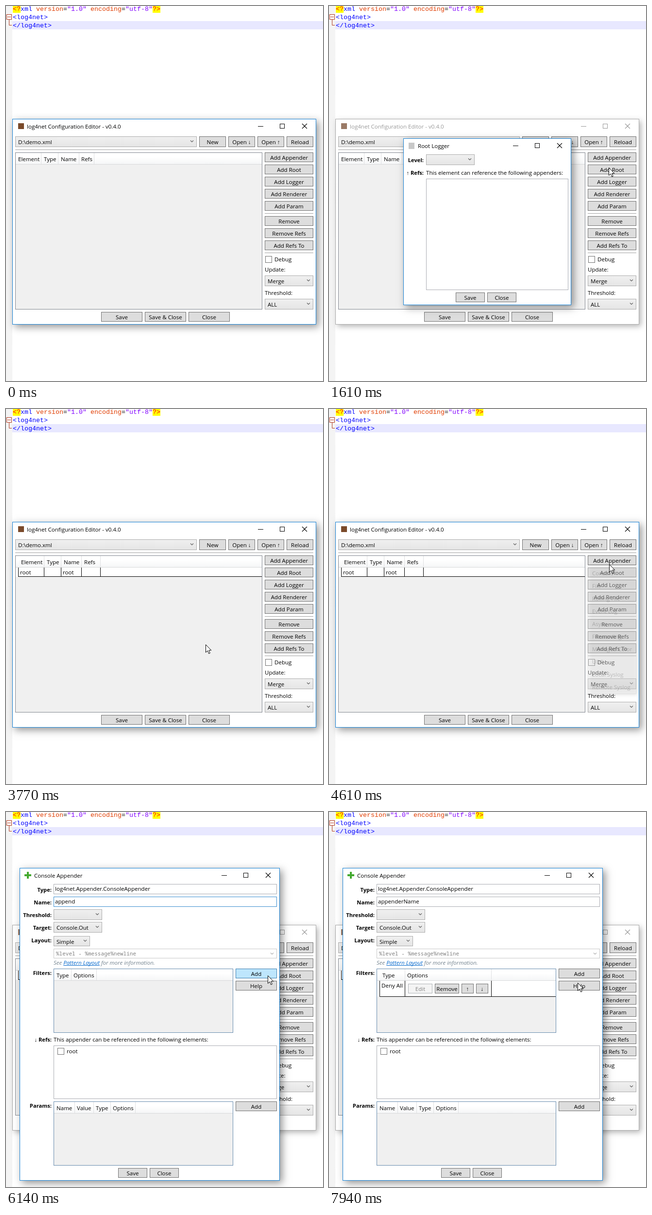
These frames come from a looping animation (653 by 771 pixels, 8000 ms). An HTML page with a canvas:

```html
<!DOCTYPE html>
<html lang="en">
<head>
<meta charset="utf-8">
<title>Configuration editor demo</title>
<style>
html, body { margin: 0; width: 100%; height: 100%; overflow: hidden; background: #fff; }
canvas { display: block; }
</style>
</head>
<body>
<canvas id="stage" width="653" height="771"></canvas>
<script>
const ctx = document.getElementById('stage').getContext('2d');
const LOOP = 8000;
const UI = '11.55px "Open Sans", "Noto Sans", sans-serif';
const BOLD = 'bold 11.2px "Open Sans", "Noto Sans", sans-serif';
const ITALIC = 'italic 11.55px "Open Sans", "Noto Sans", sans-serif';
const CODE = '13.333px "Liberation Mono", monospace';
const MONO = '11px "Noto Sans Mono", monospace';

// Each move: start, end, target x, target y
const START = [26, 470];
const MOVES = [
  [250, 1290, 576, 332], [1860, 2860, 296, 597], [3330, 4330, 577, 319],
  [4750, 4950, 576, 338], [5700, 6500, 512, 334], [6700, 6880, 512, 351]
];
const PRESSES = [[1290, 1360], [2860, 2920], [4330, 4400], [6520, 6600]];
const APPENDERS = ['Console', 'File', 'Rolling File', 'Event Log', 'Async', 'Forwarding',
  'Managed Color', 'UDP', 'Local Syslog', 'Remote Syslog'];
const FILTERS = ['Deny All', 'Level', 'Level Range', 'Logger', 'String', 'Property'];

let t = 0, hot = null;

const ramp = (a, b) => Math.min(1, Math.max(0, (t - a) / (b - a)));
const within = (a, b) => t >= a && t < b;

function pointer(time) {
  let [x, y] = START;
  for (const [a, b, tx, ty] of MOVES) {
    const p = Math.min(1, Math.max(0, (time - a) / (b - a)));
    const e = (1 - Math.cos(Math.PI * p)) / 2;
    x += (tx - x) * e;
    y += (ty - y) * e;
  }
  return [x, y];
}

function fill(x, y, w, h, color) {
  ctx.fillStyle = color;
  ctx.fillRect(x, y, w, h);
}

function box(x, y, w, h, color, border) {
  fill(x, y, w, h, color);
  ctx.strokeStyle = border;
  ctx.lineWidth = 1;
  ctx.strokeRect(x + .5, y + .5, w - 1, h - 1);
}

function text(str, x, y, { color = '#000', font = UI, align = 'left' } = {}) {
  ctx.font = font;
  ctx.fillStyle = color;
  ctx.textAlign = align;
  ctx.fillText(str, x, y);
  return x + ctx.measureText(str).width;
}

function line(color, width, ...points) {
  ctx.strokeStyle = color;
  ctx.lineWidth = width;
  ctx.beginPath();
  for (let i = 0; i < points.length; i += 2) ctx.lineTo(points[i], points[i + 1]);
  ctx.stroke();
}

function shadowed(strength, size, draw) {
  ctx.save();
  ctx.shadowColor = `rgba(0,0,0,${strength})`;
  ctx.shadowBlur = size;
  ctx.shadowOffsetX = ctx.shadowOffsetY = size / 3;
  draw();
  ctx.restore();
}

function button(x, y, w, h, label, enabled = true) {
  const over = hot && hot[0] >= x && hot[0] < x + w && hot[1] >= y && hot[1] < y + h;
  const down = over && PRESSES.some(p => within(...p));
  if (!enabled) box(x, y, w, h, '#f4f4f4', '#adb2b5');
  else if (over) box(x, y, w, h, down ? '#c4e5f6' : '#bee6fd', down ? '#2c628b' : '#3c7fb1');
  else box(x, y, w, h, '#ddd', '#707070');
  text(label, x + w / 2, y + h / 2 + 5, { align: 'center', color: enabled ? '#000' : '#838383' });
}

const chevron = (x, y, color = '#606060') => line(color, 1.2, x - 3, y - 1.5, x, y + 1.5, x + 3, y - 1.5);

function combo(x, y, w, h, label = '') {
  const shade = ctx.createLinearGradient(0, y, 0, y + h);
  shade.addColorStop(0, '#f0f0f0');
  shade.addColorStop(1, '#e5e5e5');
  box(x, y, w, h, shade, '#acacac');
  text(label, x + 6, y + 16);
  chevron(x + w - 10, y + h / 2 - 1);
}

function checkbox(x, y, label, tx) {
  box(x, y, 14, 14, '#fff', '#707070');
  text(label, tx, y + 10.5);
}

// Columns: label, text x, divider x
function grid(x, y, w, h, border, columns) {
  box(x, y, w, h, '#f0f0f0', border);
  const shade = ctx.createLinearGradient(0, y, 0, y + 24);
  shade.addColorStop(.4, '#fff');
  shade.addColorStop(1, '#f5f6f7');
  fill(x + 1, y + 1, w - 2, 23, shade);
  fill(x + 1, y + 24, w - 2, 1, '#d8d9da');
  for (const [label, tx, divider] of columns) {
    text(label, tx, y + 18);
    fill(divider, y + 1, 1, 23, '#dedfe1');
  }
}

function gridRow(x, right, y, h, dividers) {
  fill(x - 5, y, right - x + 5, h, '#fff');
  fill(x, y + h - 1, right - x, 1, '#000');
  for (const d of [x, ...dividers]) fill(d, y, 1, h, '#000');
}

function frame(x, y, w, h, title, active) {
  shadowed(active ? .42 : .3, active ? 15 : 11, () => fill(x, y, w, h, '#fff'));
  box(x, y, w, h, '#fff', active ? '#1883d7' : '#aaa');
  const ink = active ? '#000' : '#999', r = x + w, c = y + 15;
  text(title, x + 30, y + 20, { color: ink });
  fill(r - 120, c, 11, 1, ink);
  ctx.strokeStyle = ink;
  ctx.strokeRect(r - 74.5, c - 4.5, 9, 9);
  line(ink, 1.1, r - 29, c - 5, r - 19, c + 5);
  line(ink, 1.1, r - 29, c + 5, r - 19, c - 5);
}

function menu(x, y, w, items, alpha, selected) {
  if (alpha <= 0) return;
  ctx.save();
  ctx.globalAlpha = alpha;
  const h = items.length * 26 + 4;
  shadowed(.55, 7, () => fill(x, y, w, h, '#f0f0f0'));
  box(x, y, w, h, '#f2f2f2', '#a0a0a0');
  if (selected) box(x + 2, y + 2, w - 4, 26, '#c3e1f0', '#26a0da');
  items.forEach((item, i) => text(item, x + 9, y + 20 + i * 26));
  ctx.restore();
}

function editor() {
  fill(0, 0, 653, 771, '#fff');
  fill(0, 0, 13, 771, hatch);
  fill(13, 31, 640, 17, '#e8e8ff');
  fill(14, 0, 16, 14, '#ff0');
  fill(302, 0, 16, 14, '#ff0');
  const parts = [['<?', '#f00'], ['xml', '#00f'], [' version', '#e03c00'], ['=', '#000'],
    ['"1.0"', '#8000ff'], [' encoding', '#e03c00'], ['=', '#000'], ['"utf-8"', '#8000ff'], ['?>', '#f00']];
  let x = 14;
  for (const [str, color] of parts) x = text(str, x, 10, { color, font: CODE });
  text('<log4net>', 14, 27, { color: '#00f', font: CODE });
  text('</log4net>', 14, 44, { color: '#00f', font: CODE });
  box(1, 17, 11, 11, '#fff', '#b03a20');
  line('#b03a20', 1, 3, 22.5, 10, 22.5);
  line('#b03a20', 1, 6.5, 28, 6.5, 39.5, 12, 39.5);
}

function mainWindow(active) {
  frame(13, 232, 626, 423, 'log4net Configuration Editor - v0.4.0', active);
  fill(25, 241, 12, 12, active ? '#7a4a2a' : '#9a7a66');
  combo(19, 268, 374, 22, 'D:\\demo.xml');
  ['New', 'Open ↓', 'Open ↑', 'Reload'].forEach((s, i) => button(398 + i * 60, 268, 55, 22, s));
  fill(19, 295, 614, 1, '#a0a0a0');
  const saved = t >= 2950;
  grid(19, 301, 509, 323, '#828790', saved
    ? [['Element', 31, 78], ['Type', 84, 113], ['Name', 119, 155], ['Refs', 161, 194]]
    : [['Element', 25, 72], ['Type', 78, 107], ['Name', 113, 150], ['Refs', 155, 181]]);
  if (saved) {
    gridRow(25, 527, 326, 19, [78, 113, 155, 194]);
    text('root', 29, 340);
    text('root', 117, 340);
  }
  ['Appender', 'Root', 'Logger', 'Renderer', 'Param'].forEach((s, i) => button(533, 301 + i * 25, 100, 20, 'Add ' + s));
  fill(533, 426, 100, 1, '#a0a0a0');
  ['Remove', 'Remove Refs', 'Add Refs To'].forEach((s, i) => button(533, 432 + i * 25, 100, 20, s));
  fill(533, 507, 100, 1, '#a0a0a0');
  checkbox(534, 514, 'Debug', 553);
  text('Update:', 533, 546);
  combo(533, 554, 100, 22, 'Merge');
  text('Threshold:', 533, 594);
  combo(533, 602, 100, 22, 'ALL');
  ['Save', 'Save & Close', 'Close'].forEach((s, i) => button(196 + i * 90, 629, 85, 20, s));
}

const label = (str, x, y) => text(str, x, y, { font: BOLD, align: 'right' });

function rootDialog() {
  frame(153, 272, 346, 343, 'Root Logger', true);
  fill(164, 281, 12, 13, '#c8c8c8');
  label('Level:', 195, 321);
  combo(200, 305, 100, 22);
  label('↑ Refs:', 195, 347);
  text('This element can reference the following appenders:', 200, 347);
  box(200, 355, 293, 229, '#fff', '#abadb3');
  button(261, 589, 60, 20, 'Save');
  button(326, 589, 60, 20, 'Close');
}

function appenderDialog() {
  frame(28, 115, 536, 643, 'Console Appender', true);
  fill(43, 123, 4, 14, '#43a92f');
  fill(38, 128, 14, 4, '#43a92f');
  [['Type:', 164], ['Name:', 190], ['Threshold:', 216], ['Target:', 242], ['Layout:', 268],
    ['Filters:', 335], ['↓ Refs:', 472], ['Params:', 608]].forEach(([s, y]) => label(s, 94, y));
  box(98, 148, 460, 21, '#fff', '#abadb3');
  text('log4net.Appender.ConsoleAppender', 101, 162);
  box(98, 174, 460, 21, '#fff', t < 6580 ? '#3c8fd0' : '#abadb3');
  const typed = t < 5750 ? 0 : Math.floor((t - 5750) / 69) + 1;
  text('appenderName'.slice(0, typed), 101, 188);
  combo(98, 200, 100, 22);
  combo(98, 226, 100, 22, 'Console.Out');
  combo(98, 255, 75, 21, 'Simple');
  box(98, 281, 460, 20, '#fff', '#c8c8c8');
  text('%level - %message%newline', 103, 295, { font: MONO, color: '#808080' });
  chevron(548, 291, '#b0b0b0');
  const note = { font: ITALIC, color: '#748490' };
  const from = text('See ', 98, 314, note);
  const to = text('Pattern Layout', from, 314, { font: ITALIC, color: '#0066cc' });
  fill(from, 315, to - from, 1, '#0066cc');
  text(' for more information.', to, 314, note);

  const added = t >= 7330;
  grid(98, 322, 370, 132, '#688caf', added
    ? [['Type', 110, 156], ['Options', 161, 334]] : [['Type', 104, 134], ['Options', 139, 186]]);
  if (added) {
    gridRow(104, 467, 347, 33, [156, 334]);
    text('Deny All', 108, 361);
    button(163, 353, 50, 20, 'Edit', false);
    button(218, 353, 50, 20, 'Remove');
    button(273, 353, 25, 20, '↑');
    button(303, 353, 25, 20, '↓');
  }
  button(473, 322, 85, 20, 'Add');
  button(473, 347, 85, 20, 'Help');
  text('This appender can be referenced in the following elements:', 98, 472);
  box(98, 480, 460, 110, '#fff', '#abadb3');
  checkbox(106, 485, 'root', 125);
  grid(98, 595, 370, 132, '#688caf',
    [['Name', 104, 141], ['Value', 146, 180], ['Type', 185, 215], ['Options', 220, 266]]);
  button(473, 595, 85, 20, 'Add');
  button(231, 732, 60, 20, 'Save');
  button(296, 732, 60, 20, 'Close');
}

// Fades and grows a dialog around its centre
function opening(alpha, cx, cy, draw) {
  if (alpha <= 0) return;
  const s = .94 + .06 * alpha;
  ctx.save();
  ctx.globalAlpha = alpha;
  ctx.translate(cx, cy);
  ctx.scale(s, s);
  ctx.translate(-cx, -cy);
  draw();
  ctx.restore();
}

function arrow([x, y]) {
  ctx.save();
  ctx.translate(Math.round(x) + .5, Math.round(y) + .5);
  const shape = new Path2D('M0 0V16L3.7 12.5L6.3 18.5L8.8 17.4L6.3 11.6H11.3Z');
  ctx.fillStyle = '#fff';
  ctx.fill(shape);
  ctx.strokeStyle = '#000';
  ctx.lineWidth = 1;
  ctx.stroke(shape);
  ctx.restore();
}

const tile = new OffscreenCanvas(2, 2);
const tileCtx = tile.getContext('2d');
tileCtx.fillStyle = '#fff';
tileCtx.fillRect(0, 0, 2, 2);
tileCtx.fillStyle = '#e9e9e9';
tileCtx.fillRect(0, 0, 1, 1);
tileCtx.fillRect(1, 1, 1, 1);
const hatch = ctx.createPattern(tile, 'repeat');

function render() {
  t = performance.now() % LOOP;
  const tip = t >= 310 ? pointer(t - 40) : null;
  const active = t < 1300 || within(2900, 5060);

  editor();
  hot = active && t < 4450 ? tip : null;
  mainWindow(active);

  hot = within(1600, 2900) ? tip : null;
  opening(ramp(1360, 1560) * (1 - ramp(2900, 3050)), 326, 443, rootDialog);

  hot = within(5060, 6600) ? tip : null;
  opening(ramp(5030, 5120), 296, 436, appenderDialog);

  menu(533, 322, 100, APPENDERS, ramp(4540, 4890) * (1 - ramp(5118, 5270)), within(4900, 5060));
  menu(473, 343, 85, FILTERS, ramp(6620, 6860) * (1 - ramp(7330, 7900)), within(6800, 7330));

  if (within(5500, 5750)) {
    box(576, 357, 110, 26, '#f8f8fb', '#767676');
    text('Add a root logger', 582, 374);
  }
  if (tip) arrow(pointer(t));
  requestAnimationFrame(render);
}
requestAnimationFrame(render);
</script>
</body>
</html>
```
